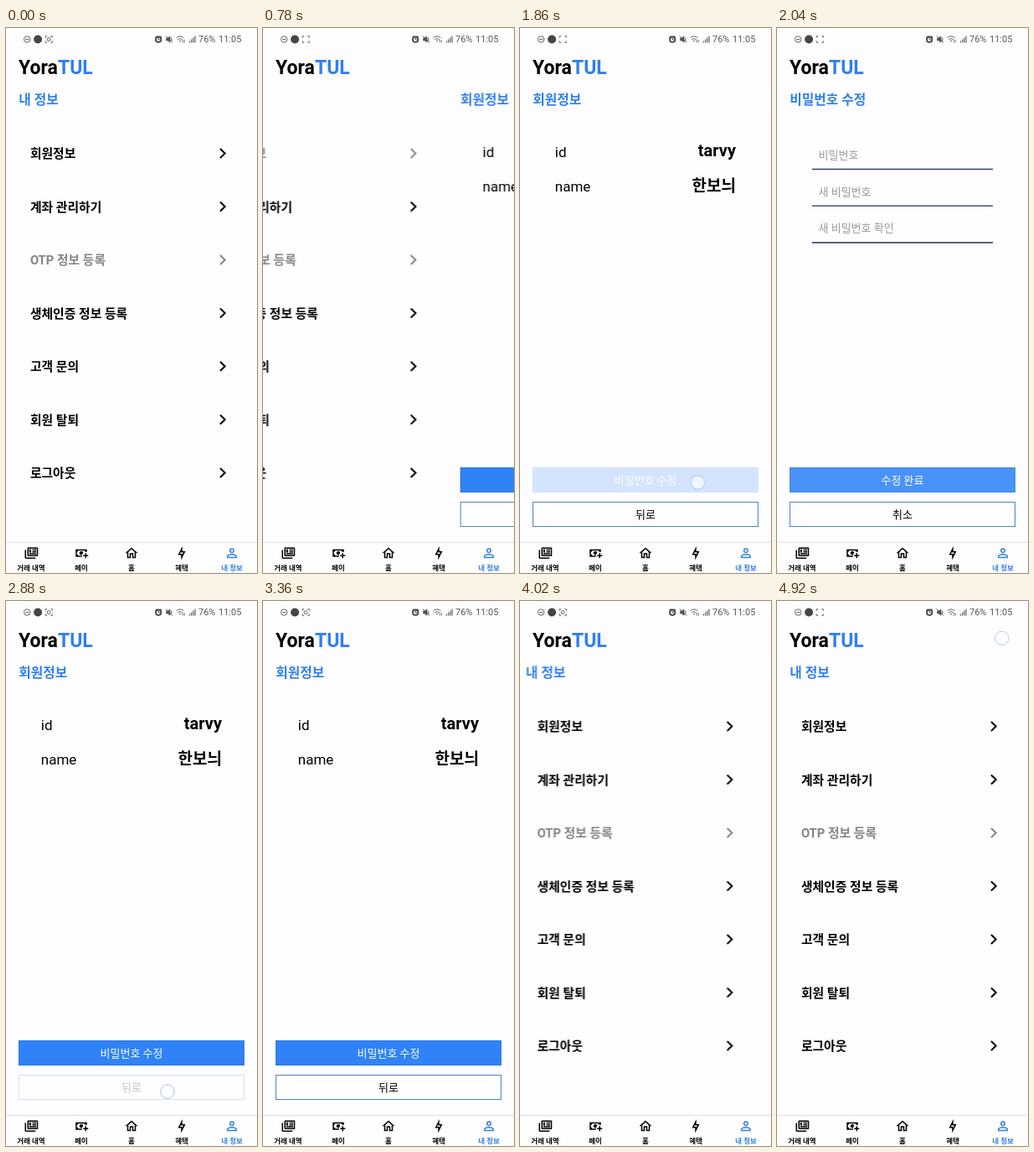
These frames come from a looping animation (300 px wide and 650 px high, 4.98 s). An HTML page:

```html
<!DOCTYPE html>
<html lang="ko">
<head>
<meta charset="utf-8">
<title>내 정보</title>
<style>
html, body { margin: 0; width: 100%; height: 100%; overflow: hidden; background: #fefdff; }
svg { display: block; width: 300px; height: 650px; overflow: hidden; }
text { font-family: Roboto, "Noto Sans CJK KR", "Noto Sans CJK", sans-serif; }
.logo { font-size: 23px; font-weight: 700; }
.title { font-size: 15.8px; font-weight: 700; fill: #2f80ed; }
.row { font-size: 14.8px; font-weight: 700; }
.row path { fill: none; stroke: #000; stroke-width: 2; }
.off { fill: #858585; }
.off path { stroke: #858585; }
.key { font-size: 17px; }
.value { font-size: 20px; font-weight: 700; text-anchor: end; }
.label { font-size: 13px; text-anchor: middle; }
.hint { font-size: 13px; fill: #999; }
.line { stroke: #222c62; stroke-width: 1.3; }
.tabs { font-size: 8.5px; font-weight: 700; text-anchor: middle; }
.status { font-size: 11px; fill: #585858; }
.icon { fill: none; stroke: #606060; stroke-width: 1; }

.menu, .detail, .tap, .primary, .secondary, .info, .form, .pressed, .blink {
  animation: 4980ms linear infinite;
}
.menu { animation-name: menu; }
.detail { animation-name: detail; }
.pressed { animation-name: pressed; }
.primary { animation-name: primary; }
.secondary { animation-name: secondary; }
.info { animation-name: info; animation-timing-function: steps(1, end); }
.form { animation-name: form; animation-timing-function: steps(1, end); }
.tap { animation-name: tap; animation-timing-function: steps(1, end); }
.blink { animation-name: blink; animation-timing-function: steps(1, end); }

@keyframes menu {
  0%, 14.056% { transform: translateX(0); animation-timing-function: cubic-bezier(.4, 0, .2, 1); }
  20.281% { transform: translateX(-300px); }
  76.707% { transform: translateX(-300px); animation-timing-function: cubic-bezier(.4, 0, .2, 1); }
  81.827%, 100% { transform: translateX(0); }
}
@keyframes detail {
  0%, 14.056% { transform: translateX(300px); animation-timing-function: cubic-bezier(.4, 0, .2, 1); }
  20.281% { transform: translateX(0); }
  76.707% { transform: translateX(0); animation-timing-function: cubic-bezier(.4, 0, .2, 1); }
  81.827%, 100% { transform: translateX(300px); }
}
@keyframes pressed {
  0%, 13.24% { opacity: 1; }
  13.25%, 14.05% { opacity: .2; }
  19%, 100% { opacity: 1; }
}
@keyframes primary {
  0%, 37.33% { opacity: 1; }
  37.34% { opacity: .2; animation-timing-function: ease-in-out; }
  42.369%, 100% { opacity: 1; }
}
@keyframes secondary {
  0%, 55.422% { opacity: 1; }
  56.627% { opacity: .2; }
  57.229% { opacity: .2; animation-timing-function: ease-in-out; }
  62.249%, 73.494% { opacity: 1; }
  76.506% { opacity: .2; }
  76.908% { opacity: .2; animation-timing-function: ease-in-out; }
  81.928%, 100% { opacity: 1; }
}
@keyframes info {
  0% { opacity: 1; }
  38.5% { opacity: 0; }
  56.827%, 100% { opacity: 1; }
}
@keyframes form {
  0% { opacity: 0; }
  38.5% { opacity: 1; }
  56.827%, 100% { opacity: 0; }
}
@keyframes tap {
  0% { opacity: 0; transform: translate(205px, 150px); }
  13.24% { opacity: 1; transform: translate(205px, 150px); }
  14.4% { opacity: 0; }
  37.34% { opacity: 1; transform: translate(212.5px, 542px); }
  38.55% { opacity: 0; }
  55.41% { opacity: 1; transform: translate(193px, 585px); }
  58.6% { opacity: 0; }
  73.48% { opacity: 1; transform: translate(196.5px, 583px); }
  77.9% { opacity: 0; }
  97.58%, 100% { opacity: 1; transform: translate(268.7px, 44.3px); }
}
</style>
</head>
<body>
<svg viewBox="0 0 300 650">
  <rect width="300" height="650" fill="#fefdff"/>

  <g class="menu">
    <text class="title" x="15.2" y="90.6">내 정보</text>
    <g id="rows"></g>
  </g>

  <g class="detail">
    <g class="info">
      <text class="title" x="15.2" y="90.6">회원정보</text>
      <text class="key" x="41.8" y="154.3">id</text>
      <text class="value" x="258" y="153.3">tarvy</text>
      <text class="key" x="41.8" y="195.3">name</text>
      <text class="value" x="258" y="194.5" style="font-size:19px">한보늬</text>
    </g>
    <g class="form">
      <text class="title" x="15.2" y="90.6">비밀번호 수정</text>
      <text class="hint" x="49.5" y="155.7">비밀번호</text>
      <text class="hint" x="49.5" y="199.5">새 비밀번호</text>
      <text class="hint" x="49.5" y="243.3">새 비밀번호 확인</text>
      <path class="line" d="M42 168.4H258M42 212.2H258M42 256H258"/>
    </g>
    <g class="primary">
      <rect x="15.5" y="524.5" width="269" height="29" fill="#2f82f8" stroke="#2c78dc"/>
      <g class="label" fill="#fff">
        <text class="info" x="150" y="543.7">비밀번호 수정</text>
        <text class="form" x="150" y="543.7">수정 완료</text>
      </g>
    </g>
    <g class="secondary">
      <rect x="15.5" y="565.5" width="269" height="29" fill="#fff" stroke="#4a82c8"/>
      <g class="label">
        <text class="info" x="150" y="584.7">뒤로</text>
        <text class="form" x="150" y="584.7">취소</text>
      </g>
    </g>
  </g>

  <text class="logo" x="15" y="54.7">Yora<tspan fill="#2f80ed">TUL</tspan></text>

  <g class="icon">
    <circle cx="25.2" cy="13.5" r="3.7"/>
    <path d="M23.2 13.5h4"/>
    <path d="M47.2 11.7V9.7h2M53.3 9.7h2v2M55.3 15.3v2h-2M49.2 17.3h-2v-2"/>
    <circle class="blink" cx="51.2" cy="13.5" r="2"/>
    <circle cx="182.2" cy="13.7" r="3.2" stroke="#444" stroke-width="1.8"/>
    <path d="M182.2 11.8v2.2h1.6M178.4 11.2l2-1.7M186 11.2l-2-1.7" stroke="#444"/>
    <path d="M191.5 12h1.8l2.7-2.2v7.4l-2.7-2.2h-1.8z" fill="#555" stroke="#555" stroke-width=".6"/>
    <path d="M191 9.5l8 8M197.3 11.6q1.4 1.9 0 3.8" stroke="#444"/>
    <path d="M203.5 11.7q4.5-3.7 9 0M205.2 13.8q2.8-2.2 5.6 0M207 15.8q1-.8 2 0"/>
    <path d="M211.3 14v3.6M213.3 17.6V14" stroke-width=".8"/>
    <path d="M219.4 17.5v-2M221.6 17.5v-4M223.8 17.5v-6M226 17.5v-8" stroke-width="1.2"/>
  </g>
  <circle cx="38.1" cy="13.5" r="5" fill="#454545"/>
  <text class="status" x="230" y="17.3">76%</text>
  <text class="status" x="254" y="17.3">11:05</text>

  <rect y="614" width="300" height="36" fill="#fefefe"/>
  <path d="M0 613.5H300" stroke="#dedee2"/>
  <g class="tabs" id="tabs"></g>

  <circle class="tap" r="8.2" fill="#fff" fill-opacity=".65" stroke="#adc3dc"/>
</svg>
<script>
const rows = ['회원정보', '계좌 관리하기', 'OTP 정보 등록', '생체인증 정보 등록', '고객 문의', '회원 탈퇴', '로그아웃'];
const rowState = ['pressed', '', 'off'];
document.getElementById('rows').innerHTML = rows.map((name, i) => {
  const y = 149.5 + i * 63.5;
  return `<g class="row ${rowState[i] || ''}"><text x="28.9" y="${y + 5.6}">${name}</text>
    <path d="M256 ${y - 5.5}l5.7 5.5l-5.7 5.5"/></g>`;
}).join('');

const tabs = [
  ['거래 내역', 'M4 7V19H19V21H4C2 21 2 19 2 19V7H4M21 5V15H8V5H21M21.3 3H7.7C6.76 3 6 3.7 6 4.55V15.45C6 16.31 6.76 17 7.7 17H21.3C22.24 17 23 16.31 23 15.45V4.55C23 3.7 22.24 3 21.3 3M9 6H12V11H9V6M20 14H9V12H20V14M20 8H14V6H20V8M20 11H14V9H20V11Z'],
  ['페이', 'M15 15V17H18V20H20V17H23V15H20V12H18V15M14.97 11.61C14.85 10.28 13.59 8.97 12 9C10.3 9.03 9 10.3 9 12C9 13.7 10.3 14.94 12 15C12.38 15 12.77 14.92 13.14 14.77C13.41 13.67 13.86 12.63 14.97 11.61M13 16H7C7 14.9 6.11 14 5 14V10C6.11 10 7 9.11 7 8H17C17 9.11 17.9 10 19 10V10.06C19.67 10.06 20.34 10.18 21 10.4V6H3V18H13.32C13.1 17.33 13 16.66 13 16Z'],
  ['홈', 'M12 5.69L17 10.19V18H15V12H9V18H7V10.19L12 5.69M12 3L2 12H5V20H11V14H13V20H19V12H22L12 3'],
  ['혜택', 'M11 9.47V11H14.76L13 14.53V13H9.24L11 9.47M13 1L6 15H11V23L18 9H13V1Z'],
  ['내 정보', 'M12 4A4 4 0 0 1 12 12A4 4 0 0 1 12 4M12 6A2 2 0 0 0 12 10A2 2 0 0 0 12 6M12 13C14.67 13 20 14.33 20 17V20H4V17C4 14.33 9.33 13 12 13M12 14.9C9.03 14.9 5.9 16.36 5.9 17V18.1H18.1V17C18.1 16.36 14.97 14.9 12 14.9Z']
];
document.getElementById('tabs').innerHTML = tabs.map(([name, icon], i) => {
  const x = 30 + i * 60;
  return `<g fill="${i === 4 ? '#2f80ed' : '#000'}">
    <path fill-rule="evenodd" transform="translate(${x - 9} 617.3) scale(.75)" d="${icon}"/>
    <text x="${x}" y="647.2">${name}</text></g>`;
}).join('');

// The recording mark toggles every 300 ms; the loop is no whole number of toggles.
const loop = 4980;
let steps = '0% { opacity: 1 }';
for (let t = 58, on = 0; t < loop; t += 300, on = 1 - on) {
  steps += `${(t / loop * 100).toFixed(3)}% { opacity: ${on} }`;
}
const style = document.createElement('style');
style.textContent = `@keyframes blink { ${steps} 100% { opacity: 0 } }`;
document.head.append(style);
</script>
</body>
</html>
```
